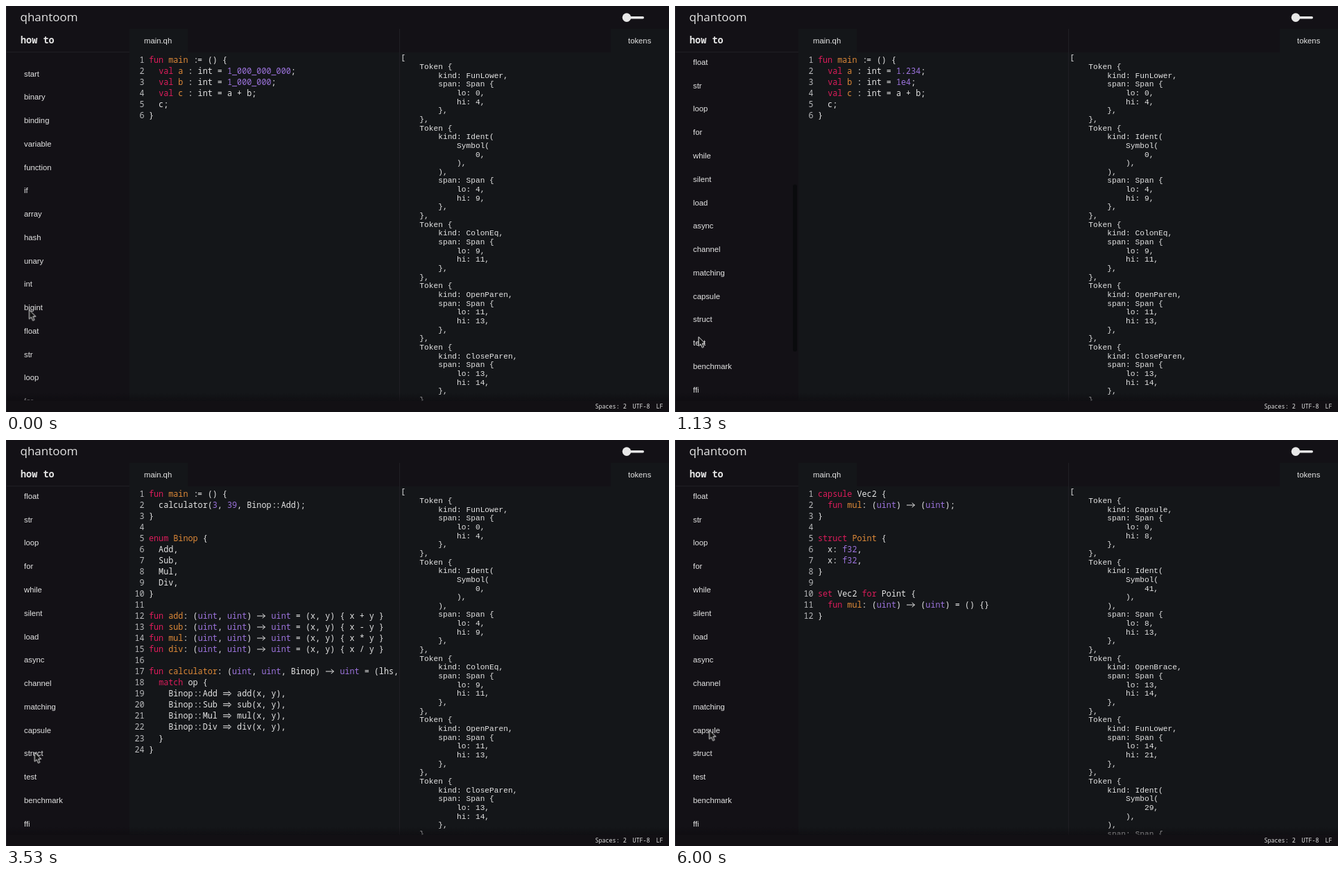
An HTML page for the animation above (6030 ms loop, 956 px wide and 586 px high).

```html
<!DOCTYPE html>
<html lang="en">
<head>
<meta charset="utf-8">
<title>qhantoom playground</title>
<style>
  :root { --side: #131116; --pane: #141619; --line: #201f24; --text: #e4e4e4; --loop: 6030ms; }
  html, body { margin: 0; width: 100%; height: 100%; overflow: hidden; background: var(--side); }
  #stage { position: relative; width: 956px; height: 586px; overflow: hidden; color: var(--text);
    font: 11.3px "Liberation Sans", Arial, sans-serif; }
  #stage div, #stage pre, .toggle, .cursor { position: absolute; margin: 0; }
  .label { line-height: 20px; white-space: pre; }
  .title { left: 20.5px; top: 5.5px; font: 500 17px/20px "Open Sans", "Noto Sans", sans-serif; }
  .howto { left: 21px; top: 39px; font: 600 13.5px/20px "Noto Sans Mono", monospace; }
  .status { font: 8.4px/12px "Noto Sans Mono", monospace; top: 572px; }
  .tab { top: 33px; height: 34px; background: var(--pane); }
  .toggle { left: 886px; top: 8px; }

  .sidebar { left: 0; top: 67px; width: 178px; height: 502px; overflow: hidden; }
  .list { left: 26px; top: 14.5px; line-height: 33.77px; white-space: pre;
    animation: scroll var(--loop) infinite linear; }
  .thumb { left: 169.5px; top: 1px; width: 6px; height: 241px; border-radius: 3px; background: #0a0b0d;
    animation: thumb var(--loop) infinite linear, thumbFade var(--loop) infinite linear; }

  .scene { left: 178px; top: 67px; width: 778px; height: 503px; background: var(--pane);
    animation: var(--loop) infinite step-end; }
  .code { left: 0; top: 0; width: 389px; height: 503px; overflow: hidden;
    font: 11.77px/16.04px "Noto Sans Mono", monospace; }
  .code pre { font: inherit; top: 1.5px; left: 28px; }
  .code .nums { left: 0; width: 21.5px; text-align: right; color: #b9babc; }
  .tokens { left: 391.5px; top: 2.3px; font: 11.2px/12.656px "Liberation Mono", "Courier New", monospace; }
  .tokenBox { left: 0; top: 0; width: 778px; height: 503px; overflow: hidden; }
  .kw { color: #dd1c5b; }
  .def { color: #df8a38; }
  .val { color: #9c73dc; }
  .lig { display: inline-block; width: 2ch; letter-spacing: -1.5px; text-indent: 1px; }
  .arrow { width: 2ch; height: 10px; vertical-align: -1px; fill: none; stroke: var(--text); stroke-width: 1; }

  .shade { left: 0; top: 559px; width: 956px; height: 11px;
    background: linear-gradient(transparent, rgba(14, 12, 16, .65)); }
  .foot { left: 0; top: 570px; width: 956px; height: 16px; background: #121014; }
  .cursor { left: 0; top: 0; overflow: visible; animation: point var(--loop) infinite ease-in-out; }

  /* Two flicks of the wheel with a short rest between them. */
  @keyframes scroll {
    0%, 8.6% { transform: none; animation-timing-function: ease-in-out; }
    11.7%, 12.5% { transform: translateY(-105.8px); animation-timing-function: ease-in-out; }
    17.8%, 100% { transform: translateY(-388.5px); }
  }
  @keyframes thumb {
    0%, 8.6% { transform: none; animation-timing-function: ease-in-out; }
    11.7%, 12.5% { transform: translateY(51.7px); animation-timing-function: ease-in-out; }
    17.8%, 100% { transform: translateY(189.7px); }
  }
  @keyframes thumbFade {
    0%, 8.5% { opacity: 0; }
    8.7%, 23% { opacity: 1; }
    26%, 100% { opacity: 0; }
  }
  @keyframes point {
    0% { transform: translate(33.5px, 438.5px); }
    3.3%, 5.5% { transform: translate(33.5px, 468px); }
    9%, 12.1% { transform: translate(33.5px, 477.5px); }
    18.8% { transform: translate(34px, 477.5px); }
    21% { transform: translate(43px, 438px); }
    26.5%, 32.7% { transform: translate(45.5px, 352.5px); }
    38%, 53.9% { transform: translate(41.3px, 384px); }
    59.7%, 76.3% { transform: translate(41.3px, 456.5px); }
    82%, 100% { transform: translate(49.5px, 418.5px); }
  }
  /* Each scene covers the earlier ones from its click onwards. */
  @keyframes float { 0% { visibility: hidden; } 5.5%, 100% { visibility: visible; } }
  @keyframes matching { 0% { visibility: hidden; } 44.8%, 100% { visibility: visible; } }
  @keyframes struct { 0% { visibility: hidden; } 64.7%, 100% { visibility: visible; } }
  @keyframes capsule { 0% { visibility: hidden; } 87%, 100% { visibility: visible; } }
</style>
</head>
<body>
<div id="stage">
  <div class="label title">qhantoom</div>
  <svg class="toggle" width="40" height="18" fill="#e8e8e8">
    <rect x="9" y="7" width="25" height="3.4" rx="1.7"/><circle cx="9" cy="8.6" r="6.3"/>
  </svg>
  <div class="label howto">how to</div>
  <div class="tab" style="left:178px;width:84px"></div>
  <div class="tab" style="left:872px;width:84px"></div>
  <div class="label" style="left:199px;top:40px">main.qh</div>
  <div class="label" style="left:897px;top:40px">tokens</div>
  <div class="sidebar"><div class="list"></div><div class="thumb"></div></div>
  <div id="scenes"></div>
  <div style="left:0;top:66px;width:178px;height:1px;background:var(--line)"></div>
  <div style="left:567px;top:33px;width:1px;height:537px;background:var(--line)"></div>
  <div class="shade"></div>
  <div class="foot"></div>
  <div class="label status" style="left:849.5px">Spaces: 2</div>
  <div class="label status" style="left:903.5px">UTF-8</div>
  <div class="label status" style="left:937.5px">LF</div>
  <div style="left:0;top:0;width:1px;height:586px;background:#242328"></div>
  <svg class="cursor" width="12" height="18">
    <path d="M0 0V13.3L3 10.5 5.2 15.5 7.5 14.5 5.4 9.6H9.4Z" fill="#111" stroke="#eee"/>
  </svg>
</div>
<script>
const topics = `start binary binding variable function if array hash unary int bigint float str loop
  for while silent load async channel matching capsule struct test benchmark ffi`;

const sum = (a, b) => `fun main := () {
  val a : int = ${a};
  val b : int = ${b};
  val c : int = a + b;
  c;
}`;

const ops = [['Add', '+'], ['Sub', '-'], ['Mul', '*'], ['Div', '/']];
const each = fn => ops.map(([name, sign]) => fn(name, name.toLowerCase(), sign)).join('\n');

const matching = `fun main := () {
  calculator(3, 39, Binop::Add);
}

enum Binop {
${each(name => `  ${name},`)}
}

${each((_, fn, sign) => `fun ${fn}: (uint, uint) -> uint = (x, y) { x ${sign} y }`)}

fun calculator: (uint, uint, Binop) -> uint = (lhs,
  match op {
${each((name, fn) => `    Binop::${name} => ${fn}(x, y),`)}
  }
}`;

const struct = `fun main := {
  val btn: Button = Button {
    id = 0,
  };
}

struct Button {
  id: uint,
}

set Button {
  fun new: (uint) -> Self = (id) {
    Self {
      id = id,
    }
  }
}`;

const capsule = `capsule Vec2 {
  fun mul: (uint) -> (uint);
}

struct Point {
  x: f32,
  x: f32,
}

set Vec2 for Point {
  fun mul: (uint) -> (uint) = () {}
}`;

// A numeric kind is the symbol index of an identifier.
const head = [['FunLower', 0, 4], [0, 4, 9], ['ColonEq', 9, 11]];
const call = [...head, ['OpenParen', 11, 13], ['CloseParen', 13, 14]];
const scenes = [
  ['bigint', sum('1_000_000_000', '1_000_000'), call],
  ['float', sum('1.234', '1e4'), call],
  ['matching', matching, call],
  ['struct', struct, [...head, ['OpenBrace', 11, 13], ['Val', 13, 20]]],
  ['capsule', capsule,
    [['Capsule', 0, 8], [41, 8, 13], ['OpenBrace', 13, 14], ['FunLower', 14, 21], [29, 21, 25]]],
];

const tag = (cls, text) => `<span class="${cls}">${text}</span>`;
const arrow = d => `<svg class="arrow" viewBox="0 0 14 10"><path d="${d}"/></svg>`;
const marks = {
  '->': arrow('M1 5H12.5M8.7 1.8L12.5 5 8.7 8.2'),
  '=>': arrow('M1 3.7H10.7M1 6.3H10.7M8.5 1.5L12.5 5 8.5 8.5'),
  ':=': tag('lig', ':='),
  '::': tag('lig', '::'),
};
const syntax = /->|=>|:=|::|\b(fun|val|enum|struct)( \w+)|\b(set|for|match|capsule)\b|\b(uint|Self|f32|\d[\w.]*)/g;

const paint = code => code.replace(syntax, (all, intro, name, word, value) =>
  intro ? tag('kw', intro) + tag('def', name) :
  word ? tag('kw', word) :
  value ? tag('val', value) : marks[all]);

const tokenText = ([kind, lo, hi]) => {
  const name = typeof kind === 'number'
    ? `Ident(\n            Symbol(\n                ${kind},\n            ),\n        )` : kind;
  return `    Token {
        kind: ${name},
        span: Span {
            lo: ${lo},
            hi: ${hi},
        },
    },`;
};

const sceneHtml = ([name, code, tokens]) => `<div class="scene" style="animation-name:${name}">
  <div class="tokenBox"><pre class="tokens">${['[', ...tokens.map(tokenText)].join('\n')}</pre></div>
  <div class="code"><pre class="nums">${code.split('\n').map((_, i) => i + 1).join('\n')}</pre><pre>${paint(code)}</pre></div>
</div>`;

document.querySelector('.list').textContent = topics.split(/\s+/).join('\n');
document.querySelector('#scenes').innerHTML = scenes.map(sceneHtml).join('');
</script>
</body>
</html>
```
